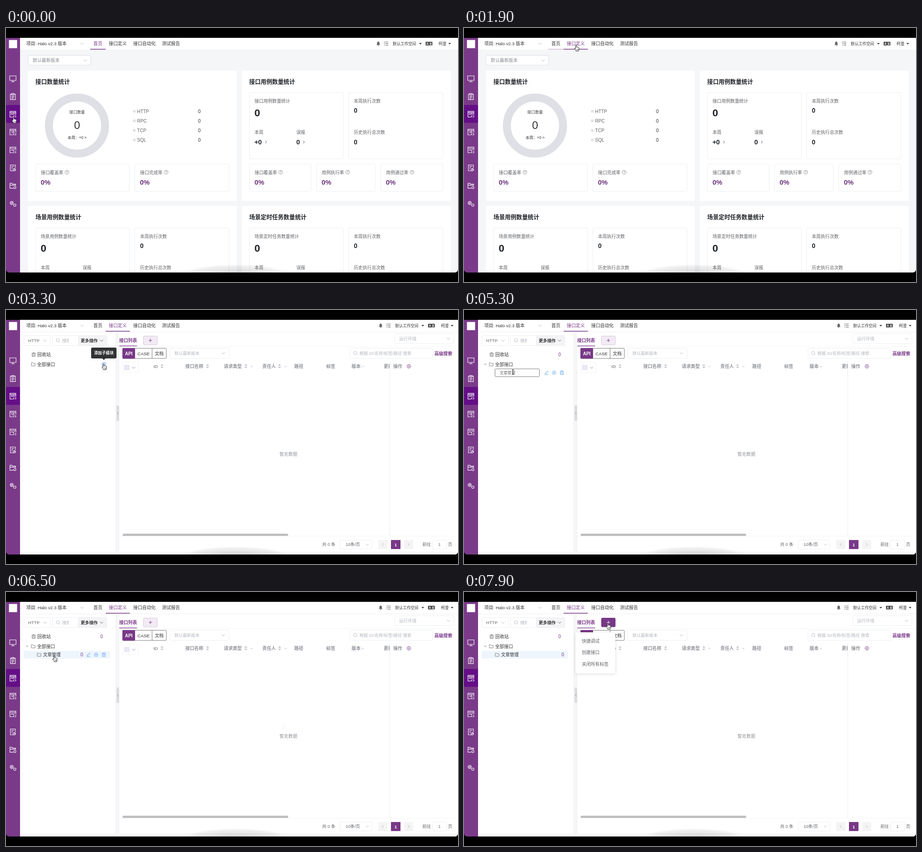
Animation of 998x561 px, one loop 8 s. Source, as an HTML page with a canvas:

```html
<!DOCTYPE html>
<html lang="zh-CN">
<head>
<meta charset="utf-8">
<style>
html, body { margin: 0; width: 100%; height: 100%; overflow: hidden; background: #000; }
canvas { display: block; }
</style>
</head>
<body>
<canvas id="stage" width="998" height="561"></canvas>
<script>
const c = document.getElementById('stage').getContext('2d');
const FONT = '"Liberation Sans", "Noto Sans CJK SC", "Noto Sans CJK", sans-serif';
const PURPLE = '#783887', INK = '#303133', MID = '#606266', GREY = '#909399', PALE = '#b4b7bf';
const EDGE = '#eceef2', BLUE = '#62a4ea';
const LOOP = 8000, STEP = 100;

function text(s, x, y, size = 9.9, color = INK, weight = '', align = 'left') {
  c.font = `${weight} ${size}px ${FONT}`;
  c.textAlign = align;
  c.fillStyle = color;
  c.fillText(s, x, y + size * 0.37);
}
function box(x0, y0, x1, y1, fill, stroke, r = 0) {
  c.beginPath();
  c.roundRect(x0, y0, x1 - x0, y1 - y0, r);
  if (fill) { c.fillStyle = fill; c.fill(); }
  if (stroke) { c.strokeStyle = stroke; c.lineWidth = 1; c.stroke(); }
}
function path(d, color, width = 1, fill) {
  const p = new Path2D(d);
  if (fill) { c.fillStyle = fill; c.fill(p); }
  if (color) { c.strokeStyle = color; c.lineWidth = width; c.stroke(p); }
}
function at(x, y, draw) {
  c.save();
  c.translate(x, y);
  draw();
  c.restore();
}
function faded(alpha, draw) {
  if (alpha <= 0) return;
  c.save();
  c.globalAlpha = alpha;
  draw();
  c.restore();
}
// Piecewise linear value from [time, value] pairs
function track(keys, t) {
  let i = 0;
  while (i < keys.length - 1 && keys[i + 1][0] <= t) i++;
  const a = keys[i], b = keys[i + 1];
  if (!b || t <= a[0]) return a.slice(1);
  const k = (t - a[0]) / (b[0] - a[0]);
  return a.slice(1).map((v, n) => v + (b[n + 1] - v) * k);
}

const down = (x, y, color = PALE, w = 3.5) =>
  at(x, y, () => path(`M${-w} ${-w / 2}L0 ${w / 2}L${w} ${-w / 2}`, color));
const side = (x, y, dir, color, w = 3) =>
  at(x, y, () => path(`M${-dir * w / 2} ${-w}L${dir * w / 2} 0L${-dir * w / 2} ${w}`, color));
const caret = (x, y) => at(x, y, () => path('M-3 -1.5L3 -1.5L0 2Z', null, 0, '#444'));
const sorter = (x, y) => at(x, y, () =>
  path('M-3.5 -1L0 -4.5L3.5 -1ZM-3.5 1.2L3.5 1.2L0 4.7Z', null, 0, '#bfc2c9'));
const folder = (x, y) => at(x, y, () =>
  path('M-4 -3.5H-1L0.2 -2.2H4.2V3.5H-4Z', MID, 0.8));
const trash = (x, y, color) => at(x, y, () =>
  path('M-4.2 -2.8H4.2M-1.5 -2.8V-4.2H1.5V-2.8M-3.2 -2.8V4H3.2V-2.8M-1.1 -0.8V2.2M1.1 -0.8V2.2', color, 0.9));
const plusRing = (x, y) => at(x, y, () =>
  path('M4 0A4 4 0 1 1 -4 0A4 4 0 1 1 4 0M-2 0H2M0 -2V2', BLUE, 0.9));
const lens = (x, y) => at(x, y, () =>
  path('M3 -0.5A3.5 3.5 0 1 1 -4 -0.5A3.5 3.5 0 1 1 3 -0.5M2 2L4 4', PALE, 0.9));
const pencil = (x, y) => at(x, y, () =>
  path('M-3 2.5L-2.5 0.5L2 -4L3.8 -2.2L-0.8 2.2ZM-4 4.2H4', BLUE, 0.9));

function header(t) {
  const home = t < 2100, dx = home ? 0 : 5.3;
  box(31, 21.5, 998, 49, '#fff');
  path('M31 48.6H998', '#e9eaed', 0.8);
  text('项目: Halo v2.3 版本', 45, 34.5, 9.8);
  down(168, 34.5);
  const second = t >= 1800;
  text('首页', 193, 34.5, 9.9, second ? INK : PURPLE);
  text('接口定义', 227, 34.5, 9.9, second ? PURPLE : INK);
  text('接口自动化', 281, 34.5);
  text('测试报告', 344.5, 34.5);
  const [first, next] = track([[0, 1, 0], [1700, 1, 0], [1900, 0.35, 1], [2100, 0, 1]], t);
  faded(first, () => box(186, 46, 220, 47.4, PURPLE));
  faded(next, () => box(220, 46, 273.5, 47.4, PURPLE));
  at(dx, 0, () => {
    path('M818 37.5Q819.5 36 819.5 33Q819.5 30 822 30Q824.5 30 824.5 33Q824.5 36 826 37.5ZM821 38.3H823V39.5H821Z', null, 0, '#666');
    path('M838 31H844M838 34.5H844M838 38H844M834.5 31L835.5 32L837 30M834.5 34.5L835.5 35.5L837 33.5M835 38H836.5', '#555', 1);
    text('默认工作空间', 854, 34.5, 8.55);
    caret(915, 34.5);
    box(926.5, 30.5, 941.5, 38.5, '#444', null, 1);
    text('A', 930.5, 34.6, 6.5, '#fff', 'bold', 'center');
    text('文', 937.5, 34.6, 6, '#fff', 'bold', 'center');
    text('柯澄', 955, 34.5, 8.55);
    caret(979.7, 34.5);
  });
}

function rate(x0, x1, label) {
  box(x0, 300.5, x1, 361, '#fff', EDGE, 2);
  text(label, x0 + 11.5, 319.5, 9.9, MID);
  const qx = x0 + 69;
  at(qx, 318.5, () => path('M4.2 0A4.2 4.2 0 1 1 -4.2 0A4.2 4.2 0 1 1 4.2 0', '#777', 0.8));
  text('?', qx, 318.7, 6.5, '#666', '', 'center');
  text('0%', x0 + 11.3, 340.5, 14.8, '#6b2f7c', 'bold');
}
function stats(x, y, title, label) {
  text(title, x, y - 24, 12.65, '#1f2329', 'bold');
  box(x + 0.5, y + 0.5, x + 208, y + 147, '#fff', EDGE, 2);
  box(x + 219.5, y + 0.5, x + 427.5, y + 147, '#fff', EDGE, 2);
  text(label, x + 11.7, y + 19.5, 9.85, MID);
  text('0', x + 11.5, y + 45, 22.5, '#1f2329', 'bold');
  text('本周', x + 11.7, y + 88.8, 9.85, MID);
  text('误报', x + 104, y + 88.8, 9.85, MID);
  text('+0', x + 11.5, y + 109.6, 14.3, '#1f2329', 'bold');
  side(x + 37, y + 110, 1, '#555');
  text('0', x + 104, y + 109.6, 14.3, '#1f2329', 'bold');
  side(x + 120.5, y + 110, 1, '#555');
  text('本周执行次数', x + 231, y + 19.5, 9.85, MID);
  text('0', x + 231, y + 40, 14, '#1f2329', 'bold');
  text('历史执行总次数', x + 231, y + 88.8, 9.85, MID);
  text('0', x + 231, y + 109.6, 14, '#1f2329', 'bold');
}
function homePage() {
  box(31, 49, 998, 540, '#f5f6f8');
  box(48.5, 60.5, 187, 82, '#fff', '#dcdfe6', 2);
  text('默认最新版本', 59, 71.5, 9.9, '#85888f');
  down(175, 71.5);
  for (const x of [48, 520.5]) {
    box(x, 94, x + 461.5, 382, '#fff', null, 3);
    box(x, 393, x + 461.5, 560, '#fff', null, 3);
  }
  text('接口数量统计', 65, 118, 12.65, '#1f2329', 'bold');
  c.beginPath();
  c.arc(156.7, 215.5, 62, 0, Math.PI * 2);
  c.strokeStyle = '#dfe0e5';
  c.lineWidth = 17.6;
  c.stroke();
  text('接口数量', 157, 185.5, 8.6, '#444', '', 'center');
  text('0', 157, 214, 24, '#333', '', 'center');
  text('本周：+0 >', 157, 242.3, 8.4, '#333', '', 'center');
  ['HTTP', 'RPC', 'TCP', 'SQL'].forEach((s, i) => {
    const y = 184 + i * 21.1;
    box(280.5, y - 2.8, 286, y + 2.8, '#dfe0e5');
    text(s, 289.5, y, 10.1, MID);
    text('0', 424, y, 10.6);
  });
  rate(65.5, 272.5, '接口覆盖率');
  rate(284.5, 492.5, '接口完成率');
  rate(537.5, 673.5, '接口覆盖率');
  rate(685.5, 815.5, '用例执行率');
  rate(827.5, 964.5, '用例通过率');
  stats(537, 142, '接口用例数量统计', '接口用例数量统计');
  stats(65, 441, '场景用例数量统计', '场景用例数量统计');
  stats(537, 441, '场景定时任务数量统计', '场景定时任务数量统计');
}

function tree(t) {
  box(39.5, 56.5, 98, 78.5, '#fff', EDGE, 2);
  text('HTTP', 49, 67.5, 9.6, MID);
  down(86, 67.5);
  box(102.5, 56.5, 160, 78.5, '#fff', EDGE, 2);
  lens(115, 67.5);
  c.save();
  c.beginPath();
  c.rect(120, 58, 18.5, 20);
  c.clip();
  text('搜索', 124, 67.5, 9.6, PALE);
  c.restore();
  box(159.5, 56.5, 222.5, 78.5, '#f4f4f6', EDGE, 1);
  text('更多操作', 165, 67.5, 9.35, INK, 'bold');
  down(211, 67.5, '#666');
  trash(61, 98.5, MID);
  text('回收站', 69, 98.5);
  text('0', 211, 98.5, 10.3, PURPLE, '', 'center');
  folder(60, 120);
  text('全部接口', 68.7, 120);

  if (t >= 2900 && t < 4300) {
    faded(0.5, () => box(210, 114, 222, 126, '#dbe9fb', null, 6));
    plusRing(216, 120);
  }
  if (t < 4300) return;
  at(47, 120, () => path('M-2.8 -1.3H2.8L0 2Z', null, 0, '#b5b8be'));
  const hover = t >= 6300 && t < 7400, editing = t < 5700;
  if (editing) {
    box(68.5, 130, 166.5, 147.3, '#fff', '#777', 2);
    const typed = t < 4900 ? '' : t < 5000 ? '文章' : '文章管理';
    text(typed, 79, 138.7, 8.55, MID);
    const blink = (t >= 4500 && t < 4700) || (t >= 4900 && t < 5300) || t >= 5500;
    if (blink) box(79 + typed.length * 8.55, 133.5, 79.9 + typed.length * 8.55, 144, '#333');
  } else {
    if (t >= 6200) box(39, 130, 229, 147, '#eef5fd');
    folder(73, 138.5);
    text('文章管理', 81.7, 138.5, 9.8);
    text('0', hover ? 167.3 : 218, 138.5, 10.3, PURPLE, '', 'center');
  }
  if (editing || hover) {
    pencil(182, 138.5);
    plusRing(199, 138.5);
    trash(216, 138.5, BLUE);
  }
}

function table(t) {
  text('接口列表', 250, 67, 9.8, PURPLE, 'bold');
  box(250, 78.8, 289.5, 80.2, PURPLE);
  path('M250 80.5H998', '#f1f1f4', 0.8);
  const lit = t >= 7700;
  box(303.5, 57.5, 334, 77, lit ? PURPLE : '#f2ebf4', lit ? PURPLE : '#d6c3dc', 2);
  path('M315.3 67.2H322.3M318.8 63.7V70.7', lit ? '#fff' : PURPLE, 1);
  box(858.5, 52.5, 989, 74, '#fff', EDGE, 2);
  text('运行环境', 868, 63.5, 9.6, PALE);
  down(977, 63.5);

  box(257.5, 84.5, 354, 107, '#fff', '#777', 2);
  box(257, 84, 285, 107.5, PURPLE, null, 2);
  path('M322.5 84.5V107', '#777', 1);
  text('API', 271, 96, 10, '#fff', 'bold', 'center');
  text('CASE', 303.7, 96, 9.8, INK, '', 'center');
  text('文档', 338.3, 96, 9.8, INK, '', 'center');
  box(361.5, 84.5, 492.5, 107, '#fff', EDGE, 2);
  text('默认最新版本', 372, 95.5, 9.2, PALE);
  down(480, 95.5);
  box(759.5, 84.5, 942, 107, '#fff', EDGE, 2);
  lens(771.5, 95.5);
  text('根据 ID/名称/标签/路径 搜索', 780.5, 95.5, 9.25, PALE);
  text('高级搜索', 946, 96, 9.8, PURPLE, 'bold');

  box(257.5, 115, 292, 138, '#fff', '#f1f1f4', 2);
  box(261.5, 122, 272, 132, '#ece8f6', '#e0daf0', 1);
  down(282, 127.3, GREY);
  const heads = [['ID', 325.5], ['接口名称', 396], ['请求类型', 481], ['责任人', 566],
    ['路径', 636.5], ['标签', 707], ['版本', 763]];
  for (const [s, x] of heads) text(s, x, 124, 9.9, GREY, 'bold');
  c.save();
  c.beginPath();
  c.rect(830, 114, 17.5, 22);
  c.clip();
  text('更新时间', 834, 124, 9.9, GREY, 'bold');
  c.restore();
  text('操作', 855, 124, 9.9, GREY, 'bold');
  for (const x of [344.5, 445, 529.5, 604]) sorter(x, 124);
  for (const x of [542, 617, 788]) down(x, 124.7, PALE, 2.4);
  at(889.5, 124.3, () => path('M-4.3 0L-2.2 -3.8H2.2L4.3 0L2.2 3.8H-2.2ZM1.5 0A1.5 1.5 0 1 1 -1.5 0A1.5 1.5 0 1 1 1.5 0', PURPLE, 0.9));
  path('M847.5 113V499', '#ebecf0', 1);
  text('暂无数据', 623.5, 318, 9.9, GREY, '', 'center');
  if (t >= 6300 && t < 6800) {
    const a = Math.PI + (t - 6500) / 100;
    c.beginPath();
    c.arc(621, 303, 10, a, a + 1.1);
    c.strokeStyle = '#e3e1e8';
    c.lineWidth = 1;
    c.stroke();
  }
  box(257.5, 494, 623, 499, '#bfbfc1', null, 2);
  path('M250 499.5H989', '#f1f1f4', 0.8);

  text('共 0 条', 698, 518, 9.3, MID);
  box(737.5, 508, 808, 528, '#fff', EDGE, 2);
  text('10条/页', 750, 518, 9.3, MID);
  down(798, 518, PALE, 3);
  box(822, 508, 842.5, 528, '#f4f4f5', null, 1);
  side(832, 518, -1, '#b5b8be', 3);
  box(850, 508, 871, 528, PURPLE, null, 1);
  text('1', 860.5, 518, 9.6, '#fff', 'bold', 'center');
  box(879, 508, 899, 528, '#f4f4f5', null, 1);
  side(889, 518, 1, '#b5b8be', 3);
  text('前往', 919.5, 518, 9.3, MID);
  box(941.5, 508, 973, 528, '#fff', EDGE, 2);
  text('1', 957, 518, 9.3, MID, '', 'center');
  text('页', 976, 518, 9.3, MID);
}

function listPage(t) {
  box(31, 49, 998, 540, '#fff');
  box(242, 49, 249.5, 540, '#f6f6f8');
  box(31, 533, 998, 540, '#f9f9fa');
  path('M242.5 49V533M249.5 80V533', '#eeeef1', 0.8);
  faded(t < 2200 ? 0.5 : 1, () => {
    tree(t);
    table(t);
  });
  box(244, 211, 250, 245, '#dcdce0', null, 2);
  side(247, 228, -1, '#999', 2.2);

  const [tip] = track([[3000, 0], [3300, 1], [4200, 1], [4300, 0]], t);
  faded(tip, () => {
    box(188, 83, 244, 107, INK, null, 3);
    path('M212.5 107H219.5L216 110.5Z', null, 0, INK);
    text('添加子模块', 216, 95, 8.6, '#fff', 'bold', 'center');
  });
  const [menu] = track([[7700, 0], [7900, 1]], t);
  faded(menu, () => {
    c.save();
    c.shadowColor = 'rgba(0,0,0,.14)';
    c.shadowBlur = 7;
    c.shadowOffsetY = 1;
    box(246, 89, 334, 180, '#fff', null, 3);
    c.restore();
    ['快捷调试', '创建接口', '关闭所有标签'].forEach((s, i) => text(s, 260, 108.5 + i * 25.3, 9.85, MID));
  });
}

const ITEMS = ['工作台', '测试跟踪', '接口测试', 'UI 测试', '性能测试', '报表统计', '项目设置', '系统设置'];
const WINDOW = 'M0 6H-6.5V-6.5H6.5V1M-6.5 -4H6.5M3 2.5L1 4.7L3 6.8M5 2.5L7 4.7L5 6.8';
const ICONS = [
  'M-7 -6H7V4H-7ZM-4 7H4M0 4V7',
  'M-2.5 -5H-5.5V7H5.5V-5H2.5M-2.5 -6.5H2.5V-3.8H-2.5ZM-3 -0.8H3M-3 2H3M-3 4.6H1',
  WINDOW,
  WINDOW,
  WINDOW + 'M-4.5 1.5L-2 -1.5L0.5 1.5L4 -2',
  'M2 6.5H-5.5V-6.5H5.5V0M-3 -3.5H3M-3 -0.8H0M-3 2H-1M6 4A2.7 2.7 0 1 1 0.6 4A2.7 2.7 0 1 1 6 4M3.3 1.3V4H6',
  'M1 5.5H-6.5V-5.5H-2L-0.5 -3.5H6V0M-6.5 -1.3H6M6.8 4A2.4 2.4 0 1 1 2 4A2.4 2.4 0 1 1 6.8 4',
  'M1 -1.5A3.6 3.6 0 1 1 -6.2 -1.5A3.6 3.6 0 1 1 1 -1.5M-1 -1.5A1.6 1.6 0 1 1 -4.2 -1.5A1.6 1.6 0 1 1 -1 -1.5M6.8 3.5A2.6 2.6 0 1 1 1.6 3.5A2.6 2.6 0 1 1 6.8 3.5'
];
function sidebar(t) {
  const [w] = track([[0, 31], [100, 56], [200, 90], [300, 105.5], [1000, 105.5], [1100, 62], [1200, 31]], t);
  c.save();
  c.beginPath();
  c.rect(0, 21.5, w, 518.5);
  c.clip();
  box(0, 21.5, 31, 540, '#7a3a89');
  faded(0.92, () => box(31, 21.5, w, 540, '#783887'));
  box(0, 170, w, 209.5, '#650f87');
  box(6.5, 26.5, 24.5, 44.5, '#fff');
  text('MeterSphere', 30.5, 35.7, 10.75, '#fff', 'bold');
  ITEMS.forEach((s, i) => {
    const y = 111.7 + i * 39.45;
    at(15.2, y, () => path(ICONS[i], '#fff', 1.1));
    if (i === 2) text('API', 15.2, y - 0.8, 6, '#fff', 'bold', 'center');
    if (i === 3) text('UI', 15.2, y - 0.6, 6.5, '#fff', 'bold', 'center');
    text(s, 31, y, 9.3, '#fff', 'bold');
  });
  at(87.5, 516, () => path('M1 -6L6 -1L4.8 -0.2L4 -0.5L1 2.5L0.8 5L-5 -0.8L-2.5 -1L0.5 -4L0.2 -4.8ZM-2 2L-6 6', '#fff', 1));
  c.restore();
}

const ARROW = 'M0 0V10L2.3 8L4 11.8L5.7 11L4 7.3H7.2Z';
const HAND = 'M-1.5 1Q-1.5 0 -0.4 0Q0.8 0 0.8 1V4.4Q1.8 3.7 2.7 4.7Q3.7 4.1 4.5 5.1Q6 4.8 6 6.3V8.8Q6 10.6 5 11.5V13H-0.8V11.8L-3.8 8Q-4.4 6.8 -3.3 6.4Q-2.5 6.3 -1.5 7.4Z';
const BEAM = 'M-2 -5.5Q0 -5.5 0 -4Q0 -5.5 2 -5.5M0 -4V4M-2 5.5Q0 5.5 0 4Q0 5.5 2 5.5';
const ROUTE = [[0, 17, 197], [100, 19, 196], [300, 26, 193], [900, 26, 193], [1000, 133, 156], [1100, 218, 142],
  [1200, 268, 132], [1300, 268, 132], [1500, 265, 110], [1700, 256, 68], [1900, 248, 38], [2400, 248, 42],
  [2700, 232, 95], [3000, 218, 120], [3300, 216, 119], [4300, 216, 120], [4400, 158, 133], [4500, 108, 137],
  [5600, 108, 137], [5900, 111, 188], [6000, 111, 188], [6300, 108, 146], [6500, 107, 141], [7200, 107, 141],
  [7500, 210, 108], [7800, 318, 69]];
function pointer(t) {
  const [x, y] = track(ROUTE, t);
  const hand = t < 1000 || (t >= 1800 && t < 2500) || (t >= 2900 && t < 4400) || (t >= 6300 && t < 7300) || t >= 7700;
  at(x, y, () => {
    if (t >= 4500 && t < 5800) {
      path(BEAM, '#fff', 2.2);
      path(BEAM, '#222', 1.1);
    } else if (hand) {
      path(HAND, '#222', 1, '#fff');
      path('M1 8.3V11M2.8 8.3V11M4.4 8.3V11', '#333', 0.7);
    } else {
      path(ARROW, '#fff', 1.6, '#000');
      path(ARROW, null, 0, '#000');
    }
  });
}

function dockShade() {
  at(507, 541, () => {
    c.scale(1, 0.17);
    const g = c.createRadialGradient(0, 0, 20, 0, 0, 112);
    g.addColorStop(0, 'rgba(60,60,65,.16)');
    g.addColorStop(0.75, 'rgba(60,60,65,.08)');
    g.addColorStop(1, 'rgba(60,60,65,0)');
    c.fillStyle = g;
    c.fillRect(-115, -115, 230, 115);
  });
}

function draw() {
  const t = Math.floor(performance.now() % LOOP / STEP) * STEP;
  c.fillStyle = '#000';
  c.fillRect(0, 0, 998, 561);
  c.save();
  c.beginPath();
  c.roundRect(0, 21.5, 998, 518.5, [0, 0, 7, 7]);
  c.clip();
  if (t < 2100) homePage(); else listPage(t);
  header(t);
  dockShade();
  sidebar(t);
  pointer(t);
  c.restore();
  requestAnimationFrame(draw);
}
draw();
</script>
</body>
</html>
```
